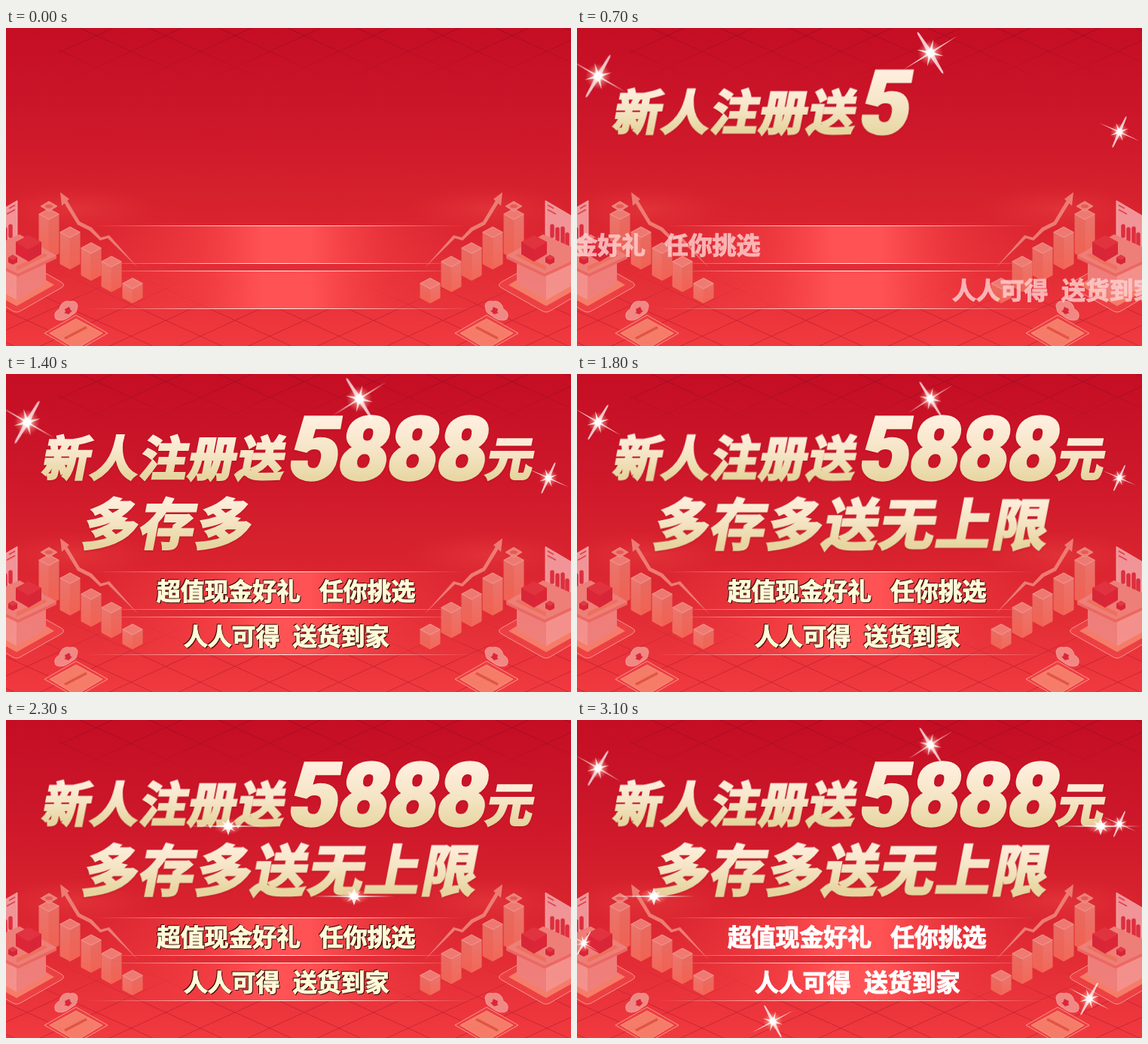
These frames come from a looping animation (750 px wide and 422 px high, 4.2 s). An HTML page:

```html
<!DOCTYPE html>
<html lang="zh-CN">
<head>
<meta charset="utf-8">
<title>新人注册</title>
<style>
html, body { margin: 0; width: 100%; height: 100%; overflow: hidden; background: #d21c2d; }
svg { display: block; width: 750px; height: 422px; }
text { font-family: "Noto Sans CJK SC", "Noto Sans CJK", sans-serif; font-weight: 900; white-space: pre; }
.title { fill: url(#gold); stroke: url(#gold); stroke-width: 3; filter: drop-shadow(0 1px 1px #a80c1e88); }
.digits { font-family: Roboto, Inter, sans-serif; }
.offer { font-size: 32px; letter-spacing: -.2px; fill: #ffd0d0; stroke: #ffd0d0; stroke-width: 1.1; opacity: .82; }
.offer.set {
  fill: #fffbd8; stroke: #fffbd8; opacity: 1;
  filter: drop-shadow(1px 1px 0 #3c0b08) drop-shadow(-1px -1px 0 #3c0b08);
}
.offer.done { fill: #fff; stroke: #fff; filter: none; }
</style>
</head>
<body>
<svg viewBox="0 0 750 422">
  <defs>
    <linearGradient id="sky" x2="0" y2="1">
      <stop stop-color="#c50e23"/><stop offset=".25" stop-color="#cb1529"/>
      <stop offset=".6" stop-color="#d9242f"/><stop offset="1" stop-color="#f13a3f"/>
    </linearGradient>
    <linearGradient id="gold" x2="0" y2="1">
      <stop offset=".22" stop-color="#ffeedd"/><stop offset=".5" stop-color="#f5e5c6"/>
      <stop offset=".82" stop-color="#e6d59f"/>
    </linearGradient>
    <linearGradient id="band">
      <stop stop-color="#f03a40" stop-opacity="0"/><stop offset=".28" stop-color="#f43f44" stop-opacity=".7"/>
      <stop offset=".45" stop-color="#ff5254"/><stop offset=".58" stop-color="#ff5254"/>
      <stop offset=".78" stop-color="#f03a40" stop-opacity=".6"/><stop offset="1" stop-color="#e8323a" stop-opacity="0"/>
    </linearGradient>
    <linearGradient id="rule">
      <stop stop-color="#ffd9cc" stop-opacity="0"/><stop offset=".3" stop-color="#ffe0d4" stop-opacity=".8"/>
      <stop offset=".5" stop-color="#fff3ea"/><stop offset=".7" stop-color="#ffe0d4" stop-opacity=".8"/>
      <stop offset="1" stop-color="#ffd9cc" stop-opacity="0"/>
    </linearGradient>
    <linearGradient id="fadeTop" x2="0" y2="1"><stop stop-color="#fff"/><stop offset="1"/></linearGradient>
    <linearGradient id="fadeLow" x2="0" y2="1"><stop/><stop offset=".6" stop-color="#fff"/></linearGradient>
    <linearGradient id="faceL" x2="0" y2="1"><stop stop-color="#ec8076"/><stop offset="1" stop-color="#f5705c"/></linearGradient>
    <linearGradient id="faceR" x2="0" y2="1"><stop stop-color="#e97469"/><stop offset="1" stop-color="#f46a56"/></linearGradient>
    <radialGradient id="haze"><stop stop-color="#f04a48" stop-opacity=".4"/><stop offset="1" stop-color="#e83a3c" stop-opacity="0"/></radialGradient>
    <radialGradient id="glow">
      <stop stop-color="#fff"/><stop offset=".28" stop-color="#fff4ec" stop-opacity=".9"/>
      <stop offset=".5" stop-color="#ffc4ac" stop-opacity=".45"/><stop offset="1" stop-color="#ff9a80" stop-opacity="0"/>
    </radialGradient>
    <pattern id="mesh" width="92" height="42" patternUnits="userSpaceOnUse" patternTransform="translate(28 10)">
      <path d="M0 0L92 42M0 42L92 0" stroke="#8e0c2a" stroke-width="1" fill="none"/>
    </pattern>
    <mask id="maskTop"><path d="M70 0H750V70H70Z" fill="url(#fadeTop)"/></mask>
    <mask id="maskLow"><path d="M0 318H750V422H0Z" fill="url(#fadeLow)"/></mask>

    <g id="star">
      <circle r="17" fill="url(#glow)"/>
      <path d="M-42 0L-3-1.3-1.3-30 0-33 1.3-30 3-1.3 42 0 3 1.3 1.3 30 0 33-1.3 30-3 1.3Z" fill="#fff" opacity=".75"/>
      <path d="M-13-13L0-3 13-13 3 0 13 13 0 3-13 13-3 0Z" fill="#fff" opacity=".85"/>
      <circle r="5" fill="#fff"/>
    </g>
    <g id="glint">
      <ellipse rx="20" ry="11" fill="url(#glow)" opacity=".8"/>
      <path d="M-54 0L-4-1 0-11 4-1 54 0 4 1 0 12-4 1Z" fill="#fff" opacity=".85"/>
      <path d="M-9-7L0-2.500 9-7 3 0 9 7 0 2.500-9 7-3 0Z" fill="#fff" opacity=".75"/>
      <ellipse rx="6" ry="4" fill="#fff"/>
    </g>

    <g id="side">
      <ellipse cx="90" cy="240" rx="110" ry="32" fill="url(#haze)"/>
      <g opacity=".88">
        <path d="M175 318L135 279 125 282 111 269 95 261 76 230 80 227 98 257 114 265 126 278 137 275Z" fill="#f0877d"/>
        <path d="M72 218L84 227 74 236Z" fill="#f0877d"/>
        <g id="bars"></g>
        <path d="M57 230L68 236.500 57 243 46 236.500Z" fill="#f08c82" stroke="#f7b0a6" stroke-width=".7"/>
        <ellipse cx="57" cy="236.500" rx="5" ry="2.500" fill="#e8625c"/>

        <path d="M8 307Q14 304 20 307L73 337Q80 341 73 345L20 375Q14 379 8 375L-50 341Z" fill="#ee4245" stroke="#f8a095"/>
        <path d="M14 311L64 341 14 369-36 341Z" fill="#f8876f"/>
        <path d="M14 316L53 306V339L14 361Z" fill="#f18a85"/>
        <path d="M-25 306L14 316V361L-25 339Z" fill="#f79e97"/>
        <path d="M15 229V282L-19 302V249Z" fill="#f5a4a6" stroke="#fbc6c2" stroke-width=".8"/>
        <path d="M12 235L4 239.500M12 241L1 247" stroke="#e04452" stroke-width="1.500"/>
        <path d="M6 263V276M-1 267V281M-8 266V286M-14 274V290" stroke="#de3040" stroke-width="5.500" stroke-linecap="round"/>
        <path d="M18 274L67 302V306L16 330-40 304V300Z" fill="#ee7068"/>
        <path d="M18 274L67 302 16 326-40 300Z" fill="#f08a82"/>
        <path d="M14 316L51 299 55 302 14 322Z" fill="#f07a62"/>
        <path d="M30 275L47 284V300L30 310 13 300V284Z" fill="#dc2638"/>
        <path d="M30 275L47 284 30 294 13 284Z" fill="#e23541"/>
        <path d="M30 294L47 284V300L30 310Z" fill="#d8263a"/>
        <path d="M9 301L15 304.500V311L9 314 3 311V304.500Z" fill="#d92537"/>
        <path d="M9 301L15 304.500 9 308 3 304.500Z" fill="#e23d46"/>

        <path d="M93 381L135 405 93 429 51 405Z" fill="#ee4044" stroke="#f8a498"/>
        <path d="M93 386L128 405 93 426 58 405Z" fill="#f7866f" stroke="#fba98f" stroke-width=".8"/>
        <path d="M78 412L107 397" stroke="#df5a45" stroke-width="3.500"/>
        <path d="M66 386C63 380 66 375 71 373 72 365 79 361 85 363 93 361 97 367 94 373 94 378 89 380 86 382 80 387 72 390 66 386Z" fill="#f2948f" stroke="#f8b9b3" stroke-width=".8"/>
        <path d="M78 373L84 370 86 375 88 375 83 380 77 378 79 377Z" fill="#d92638"/>
      </g>
    </g>
  </defs>

  <rect width="750" height="422" fill="url(#sky)"/>
  <g fill="url(#mesh)">
    <rect width="750" height="70" mask="url(#maskTop)" opacity=".7"/>
    <rect y="318" width="750" height="104" mask="url(#maskLow)" opacity=".4"/>
  </g>
  <g fill="url(#band)">
    <rect x="120" y="262" width="490" height="50"/>
    <rect x="120" y="322" width="490" height="50"/>
  </g>
  <g fill="url(#rule)">
    <rect x="115" y="262" width="495" height="1"/>
    <rect x="115" y="312" width="495" height="1"/>
    <rect x="115" y="322" width="495" height="1"/>
    <rect x="105" y="372" width="520" height="1"/>
  </g>
  <use href="#side"/>
  <use href="#side" transform="matrix(-1 0 0 1 731 0)"/>

  <g class="title">
    <text id="lead" transform="translate(46 135) skewX(-11)" font-size="63" letter-spacing="1.5"></text>
    <text id="sum" class="digits" transform="translate(371 140) skewX(-10)" font-size="117" letter-spacing="-2.5"></text>
    <text id="unit" transform="translate(635 135) skewX(-11)" font-size="62"></text>
    <text id="second" transform="translate(99 226) skewX(-11)" font-size="73" letter-spacing="2"></text>
  </g>
  <g id="row1" class="offer"><text x="200" y="300">超值现金好礼</text><text x="416" y="300">任你挑选</text></g>
  <g id="row2" class="offer"><text x="236" y="360">人人可得</text><text x="381" y="360">送货到家</text></g>
  <g id="sparks"></g>
</svg>
<script>
const $ = id => document.getElementById(id);
const STEP = 100, LAST = 31, LOOP = 4200;

const typed = [
  ["lead", "新人注册送", 1],
  ["sum", "5888", 6],
  ["unit", "元", 10],
  ["second", "多存多送无上限", 11]
];

// Isometric bars: left edge, top corner, bottom corner
const bars = [[44, 240, 306], [72, 264, 320], [100, 285, 335], [127, 303, 350], [155, 332, 365]];
$("bars").innerHTML = bars.map(([x, top, end]) => {
  const mid = x + 13, right = x + 26, edge = top + 7, fold = top + 14, foot = end - 7;
  const face = (side, fill) =>
    `<path d="M${side} ${edge}L${mid} ${fold}V${end}L${side} ${foot}Z" fill="url(#${fill})" stroke="url(#${fill})" stroke-linejoin="round"/>`;
  return face(x, "faceL") + face(right, "faceR") +
    `<path d="M${mid} ${top}L${right} ${edge} ${mid} ${fold} ${x} ${edge}Z" fill="#f0857b" stroke="#f5a095" stroke-width="1.2" stroke-linejoin="round"/>`;
}).join("");

function spark(shape) {
  const el = document.createElementNS("http://www.w3.org/2000/svg", "use");
  el.setAttribute("href", "#" + shape);
  $("sparks").append(el);
  return el;
}

const makeStar = ([x, y, turn, size]) => ({ x, y, turn, size, el: spark("star") });
const upper = [[28, 64, 30, 1], [469, 33, -32, 1], [720, 138, 24, .7]].map(makeStar);
const lower = [[9, 296, 30, .55], [260, 400, -28, .75], [680, 370, 28, .75]].map(makeStar);
const glints = [spark("glint"), spark("glint")];

function setStar({ x, y, turn, size, el }, power) {
  el.style.opacity = power > 0 ? 1 : 0;
  el.setAttribute("transform", `translate(${x} ${y}) rotate(${turn}) scale(${size * (.65 + .35 * power)})`);
}

function setRow(id, shift, settled, done) {
  $(id).setAttribute("transform", `translate(${shift} 0)`);
  $(id).classList.toggle("set", settled);
  $(id).classList.toggle("done", done);
}

function draw(k) {
  for (const [id, words, start] of typed)
    $(id).textContent = words.slice(0, Math.max(0, k - start));

  const settled = k >= 13, done = k === LAST;
  setRow("row1", Math.min(0, 50 * (k - 13)), settled, done);
  setRow("row2", Math.max(0, 612 - 50 * k), settled, done);

  const phase = k % 3.5;
  const power = k ? Math.max(0, 1 - Math.min(phase, 3.5 - phase)) : 0;
  upper.forEach(s => setStar(s, power));
  lower.forEach(s => setStar(s, k % 7 === 3 ? 1 : 0));

  // Glints sweep along both title lines in opposite directions
  const u = (k - 23) / 4;
  const spots = [[295 + 220 * u - 10 * u * u, 141], [462 - 200 * u + 10 * u * u, 234]];
  glints.forEach((el, i) => {
    el.style.opacity = k >= 19 ? 1 : 0;
    el.setAttribute("transform", `translate(${spots[i]})`);
  });
}

const begin = performance.now();
let shown = -1;
function tick() {
  const t = (performance.now() - begin) % LOOP;
  const k = Math.min(LAST, Math.floor(t / STEP));
  if (k !== shown) draw(shown = k);
  requestAnimationFrame(tick);
}
tick();
</script>
</body>
</html>
```
